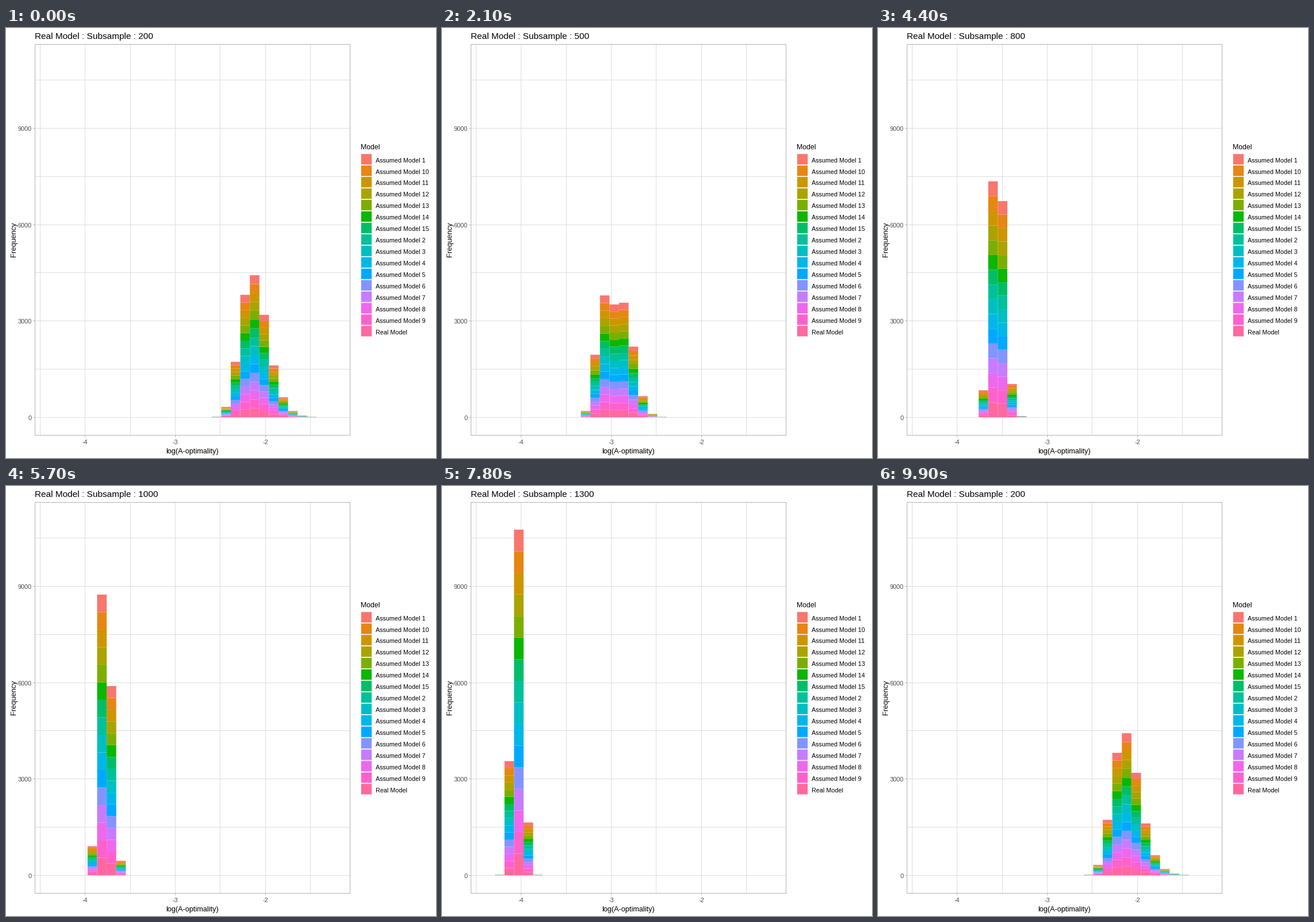
Recreate the animation shown at these times as a matplotlib script. Size 748x748 px, loop 10000 ms.

```python
import math

import numpy as np
import matplotlib.pyplot as plt
from matplotlib.animation import FuncAnimation
from matplotlib.collections import PolyCollection
from matplotlib.patches import Rectangle

SIZE, DPI = 748, 100
LEFT, TOP, RIGHT, BOTTOM = 50, 28, 598, 708
BASE, PX_PER_COUNT = 677.1, 0.05584
BINS, BIN_X, BIN_W = 30, 75.5, 16.605
GRID, BORDER, AXIS_TEXT = "#DEDEDE", "#B3B3B3", "#4D4D4D"

MODELS = [f"Assumed Model {n}" for n in sorted(range(1, 16), key=str)] + ["Real Model"]
TOTAL = 1000 * len(MODELS)

STATES = list(range(200, 1600, 100))
HOLD = 4
STEPS = [4] * 3 + [3] * 3 + [2] + [3] * 7
STARTS = [HOLD * (i + 1) + sum(STEPS[:i]) for i in range(len(STEPS))]
FRAMES = HOLD * len(STATES) + sum(STEPS)

RGB_FROM_XYZ = np.array([[3.2406, -1.5372, -0.4986],
                         [-0.9689, 1.8758, 0.0415],
                         [0.0557, -0.2040, 1.0570]])


def hcl(hue, chroma=100, lum=65):
    """Polar CIE-LUV colour as sRGB."""
    a = math.radians(hue)
    u = chroma * math.cos(a) / (13 * lum) + 0.1978
    v = chroma * math.sin(a) / (13 * lum) + 0.4683
    y = ((lum + 16) / 116) ** 3
    xyz = [y * 9 * u / (4 * v), y, y * (12 - 3 * u - 20 * v) / (4 * v)]
    lin = np.clip(RGB_FROM_XYZ @ xyz, 0, 1)
    return np.where(lin > 0.0031308, 1.055 * lin ** (1 / 2.4) - 0.055, 12.92 * lin)


COLORS = [hcl(15 + 360 * i / len(MODELS)) for i in range(len(MODELS))]


def counts(n):
    """Bin totals of a shifted log-normal that moves left and narrows with n."""
    u = math.log(n / 600)
    mean = 10.277 - 9.676 * u + 0.136 * u * u
    sd = 0.762 * math.exp(-0.575 * u)
    s = 0.15 * math.sqrt(200 / n)
    c = math.sqrt(math.exp(s * s) - 1)

    def cdf(x):
        z = max(1 + c * (x - mean) / sd, 1e-9)
        return 0.5 + 0.5 * math.erf((math.log(z) / s + s / 2) / math.sqrt(2))

    return TOTAL * np.diff([cdf(k - 0.5) for k in range(BINS + 1)])


HISTS = {n: counts(n) for n in STATES}


def blend(frame):
    """Bin totals and the nearest state at a frame."""
    i = max(sum(s <= frame for s in STARTS) - 1, 0)
    t = min(max((frame - STARTS[i] + 1) / STEPS[i], 0), 1)
    a, b = STATES[i], STATES[(i + 1) % len(STATES)]
    return (1 - t) * HISTS[a] + t * HISTS[b], b if t >= 0.5 else a


def stacks(totals):
    """Rectangles and colours of all stacked bars."""
    verts, fills = [], []
    for k, total in enumerate(totals):
        if total < 6:
            continue
        x0 = BIN_X + BIN_W * k
        x1 = x0 + BIN_W
        ys = BASE - total * PX_PER_COUNT * np.linspace(0, 1, len(COLORS) + 1)
        for color, y0, y1 in zip(COLORS[::-1], ys[:-1], ys[1:]):
            verts.append([(x0, y0), (x1, y0), (x1, y1), (x0, y1)])
            fills.append(color)
    return verts, fills


fig = plt.figure(figsize=(SIZE / DPI, SIZE / DPI), dpi=DPI, facecolor="white")
ax = fig.add_axes([0, 0, 1, 1])
ax.set_xlim(0, SIZE)
ax.set_ylim(SIZE, 0)
ax.axis("off")


def box(x, y, w, h, color, z=1):
    ax.add_patch(Rectangle((x, y), w, h, fc=color, lw=0, snap=False, zorder=z))


def label(x, y, text, px, color="black", **kw):
    kw = {"ha": "left", "va": "baseline", **kw}
    return ax.text(x, y, text, fontsize=px * 72 / DPI, color=color,
                   family="Liberation Sans", **kw)


for k in range(8):
    y = int(677.3 - 83.77 * k)
    box(LEFT, y, RIGHT - LEFT, 1, GRID)
    if k % 2 == 0:
        box(LEFT - 3, y, 3, 1, BORDER)
        label(45, y + 5, str(1500 * k), 10.9, AXIS_TEXT, ha="right")
for k in range(7):
    x = int(59.2 + 78.4 * k)
    box(x, TOP, 1, BOTTOM - TOP, GRID)
    if k in (1, 3, 5):
        box(x, BOTTOM + 1, 1, 3, BORDER)
        label(x, 724, f"-{4 - k // 2}", 10.9, AXIS_TEXT, ha="center")

for x in (LEFT, RIGHT):
    box(x, TOP, 1, BOTTOM - TOP + 1, BORDER, 4)
for y in (TOP, BOTTOM):
    box(LEFT, y, RIGHT - LEFT + 1, 1, BORDER, 4)

label(324.5, 740, "log(A-optimality)", 12.6, ha="center")
label(20, 368, "Frequency", 12.7, ha="right", va="center", rotation=90)

label(617, 211, "Model", 12.2)
for i, (name, color) in enumerate(zip(MODELS, COLORS)):
    y = 219.2 + 19.93 * i
    box(617.8, y, 18.3, 18.3, color)
    label(643, y + 14.4, name, 10.75)

title = label(50, 19, "", 15.4)
bars = PolyCollection([], linewidths=0, zorder=3, snap=False)
ax.add_collection(bars, autolim=False)


def update(frame):
    totals, state = blend(frame)
    verts, fills = stacks(totals)
    bars.set_verts(verts)
    bars.set_facecolor(fills)
    title.set_text(f"Real Model : Subsample : {state}")
    return bars, title


anim = FuncAnimation(fig, update, frames=FRAMES, interval=100, repeat=True,
                     repeat_delay=0, blit=False)
plt.show()
```
